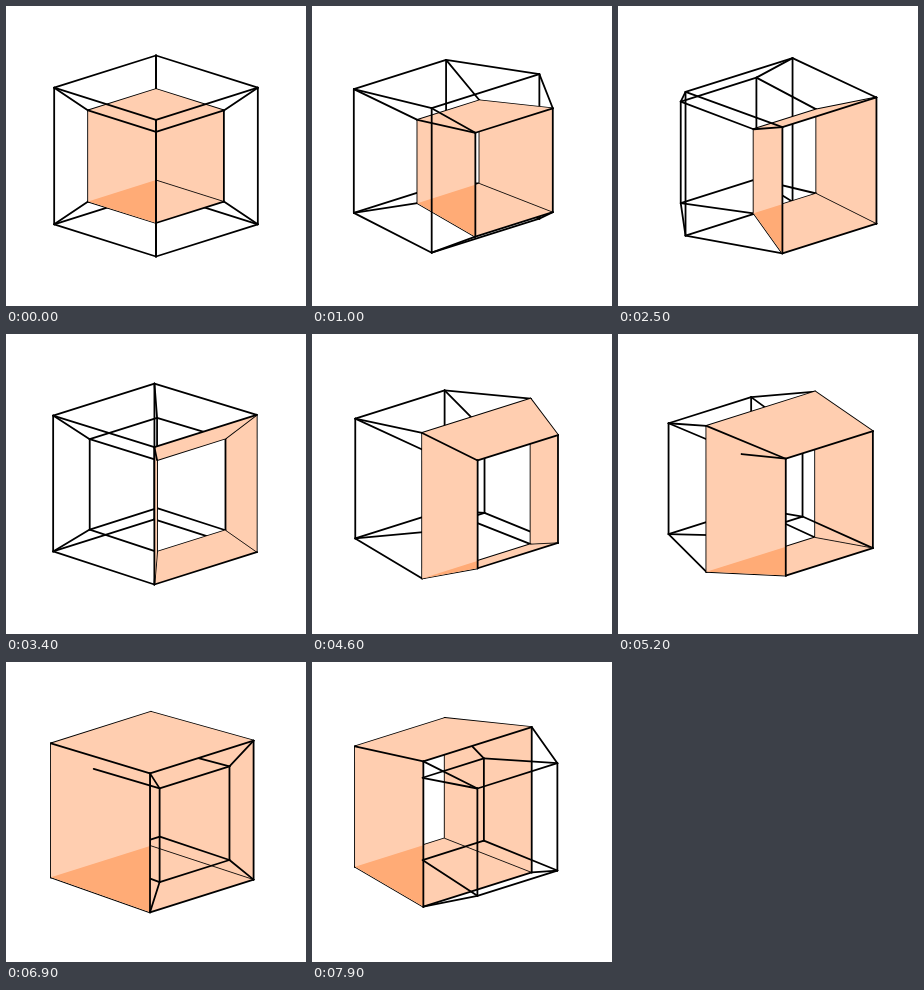
Recreate the animation shown at these times as an HTML page with a canvas. Size 300x300 px, loop 8 s.

```html
<!DOCTYPE html>
<html lang="en">
<head>
<meta charset="utf-8">
<title>Rotating tesseract</title>
<style>
  html, body { margin: 0; width: 100%; height: 100%; overflow: hidden; background: #fff; }
  canvas { display: block; width: 300px; height: 300px; }
</style>
</head>
<body>
<canvas id="stage"></canvas>
<script>
const LOOP = 8000, STEP = 100, DEG_PER_STEP = 2.7;
const CENTER = 150, HALF = 72;
const TILT = Math.atan(1 / 3), SIN = Math.sin(TILT), COS = Math.cos(TILT);
const LIGHT = '#ffceb0', DARK = '#ffab76';
const LINE = 1.8, SEAM = 0.8;
const SIGNS = [-1, 1];

const canvas = document.getElementById('stage');
const ctx = canvas.getContext('2d');
const ratio = window.devicePixelRatio || 1;
canvas.width = canvas.height = Math.round(300 * ratio);
ctx.scale(ratio, ratio);
ctx.lineCap = ctx.lineJoin = 'round';

// Corner k turns in the p-w plane; w sets the size linearly.
function project(k, q, z, turn) {
  const a = (45 + 90 * k + turn) * Math.PI / 180;
  const s = (5 + Math.SQRT2 * Math.sin(a)) / 6;
  const p = Math.SQRT2 * Math.cos(a) * s;
  const across = (p + q * s) / Math.SQRT2;
  const near = (p - q * s) / Math.SQRT2;
  return {
    x: CENTER + HALF * across,
    y: CENTER + HALF * (near * SIN - z * s * COS),
    depth: near * COS + z * s * SIN
  };
}

function trace(points) {
  ctx.beginPath();
  points.forEach(pt => ctx.lineTo(pt.x, pt.y));
}

function stroke(points, width) {
  trace(points);
  ctx.lineWidth = width;
  ctx.stroke();
}

function fill(points, color) {
  trace(points);
  ctx.fillStyle = color;
  ctx.fill();
}

function draw(turn) {
  const at = (k, q, z) => project(k % 4, q, z, turn);
  const items = [];
  const add = (points, paint) => {
    const depth = points.reduce((sum, pt) => sum + pt.depth, 0) / points.length;
    items.push({ depth, paint });
  };
  const edge = (a, b) => add([a, b], () => stroke([a, b], LINE));

  for (let k = 0; k < 4; k++) {
    for (const a of SIGNS) {
      edge(at(k, -1, a), at(k, 1, a));
      edge(at(k, a, -1), at(k, a, 1));
      for (const b of SIGNS) edge(at(k, a, b), at(k + 1, a, b));
    }
  }

  // Four filled walls of the cell between corners 2 and 3.
  const level = z => [at(2, -1, z), at(2, 1, z), at(3, 1, z), at(3, -1, z)];
  const side = q => [at(2, q, -1), at(2, q, 1), at(3, q, 1), at(3, q, -1)];
  const floor = level(-1), top = level(1), back = side(1), front = side(-1);

  add(back, () => fill(back, LIGHT));
  add(floor, () => {
    fill(floor, LIGHT);
    stroke([at(2, 1, -1), at(3, 1, -1)], SEAM);
  });
  add(top, () => fill(top, LIGHT));
  add(front, () => {
    fill(front, LIGHT);
    ctx.save();
    trace(front);
    ctx.clip();
    fill(floor, DARK);
    ctx.restore();
  });

  ctx.fillStyle = '#fff';
  ctx.fillRect(0, 0, 300, 300);
  ctx.strokeStyle = '#000';
  items.sort((a, b) => a.depth - b.depth).forEach(item => item.paint());
}

const start = performance.now();
function tick() {
  const time = (performance.now() - start) % LOOP;
  draw(Math.floor(time / STEP) * DEG_PER_STEP);
  requestAnimationFrame(tick);
}
tick();
</script>
</body>
</html>
```
